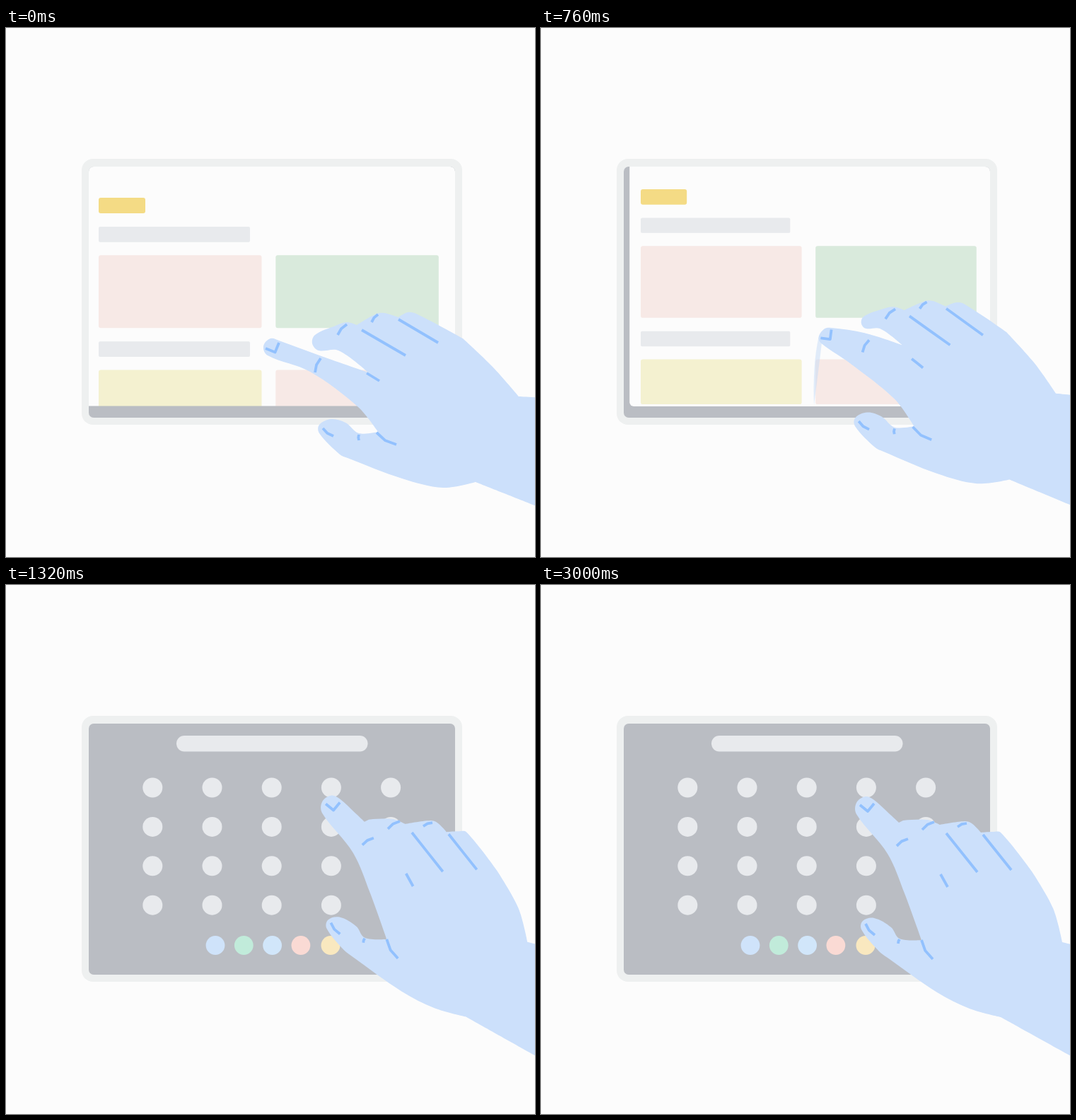
These frames come from a looping animation (748 px wide and 748 px high, 3.02 s). An HTML page with a canvas:

```html
<!DOCTYPE html>
<html lang="en">
<head>
<meta charset="utf-8">
<title>Swipe up to the launcher</title>
<style>
  html, body { margin: 0; width: 100%; height: 100%; overflow: hidden; background: #fcfcfc; }
  canvas { display: block; }
</style>
</head>
<body>
<canvas id="stage" width="748" height="748"></canvas>
<script>
const ctx = document.getElementById('stage').getContext('2d');
const LOOP = 3020;
const GREY = '#babdc3', LIGHT = '#e8eaed', HAND = '#cce0fb', CREASE = '#92c1fe';

const lerp = (a, b, k) => a + (b - a) * k;
const mix = (p, q, k) => p.map((v, i) => lerp(v, q[i], k));
const span = (t, from, to) => Math.min(1, Math.max(0, (t - from) / (to - from)));
const linear = k => k;
const easeInOut = k => (1 - Math.cos(Math.PI * k)) / 2;
const easeOut = k => 1 - (1 - k) ** 2.2;

// Keys are [time, values, easing towards that key].
function track(keys, t) {
  const next = keys.findIndex(([time]) => time > t);
  if (next < 0) return keys.at(-1)[1];
  if (next === 0) return keys[0][1];
  const [from, a] = keys[next - 1], [to, b, ease] = keys[next];
  return mix(a, b, ease(span(t, from, to)));
}

// Joints of the hand: fold (flat to raised), tilt about the wrist, curl of the index finger
const RESTING = [0, 0, 0], PRESSING = [0, 0.135, 0.3];
const JOINTS = [
  [0, RESTING],
  [560, PRESSING, easeInOut],
  [700, PRESSING, linear],
  [760, [0.25, 0, 0.17], linear],
  [1000, [1, -0.023, 0], easeOut],
  [1600, [1, 0, 0], easeOut],
];

// The app window: x, y, width, height
const FULL = [115, 196, 520, 355];
const DISC = [429.5, 420, 73, 73];
const WINDOW = [
  [700, FULL],
  [760, [125.2, 184.5, 513.5, 350.5], linear],
  [980, DISC, easeInOut],
  [1000, DISC, linear],
  [1180, [445.5, 496, 27, 27], easeInOut],
];

// Each part is drawn flat and raised; the thumb side follows the fold later.
const part = (flat, raised, options) => {
  const [a, b] = [flat, raised].map(s => s.split(' ').map(p => p.split(',').map(Number)));
  return { flat: a, raised: b, lag: 1, curls: false, bow: 0.1, ...options };
};
const INDEX = { curls: true }, THUMB = { lag: 1.6 };

const OUTLINE = [
  part('760,523 725,521 688,479 646,439 580,404 568,402 555,409 535,403 524,404 496,420 482,416 466,421 437,434 433,446 442,456 470,456 512,487',
       '760,511 737,505 724,457 694,405 650,350 638,349 622,350 609,337 599,334 564,339 546,332 524,332 512,333 510,334 508,335 506,336 506,336'),
  part('446,464 386,442 374,439 364,450 370,463',
       '492,323 471,304 459,299 446,308 446,324', INDEX),
  part('430,486 498,536 526,571 499,573 480,558 460,553 443,561 443,573 472,603 483,608 560,637 618,650 664,642 760,680',
       '490,380 514,436 538,502 507,500 495,484 471,471 455,475 453,487 478,518 490,527 560,576 606,599 650,611 760,672', THUMB),
];
const CORNERS = new Set([1, 3, 6, 9, 16, 24, 34]);
const TIP = 20;

// Creases are pairs of end points, bent sideways by the bow.
const CREASES = [
  part('367,453 386,445', '451,311 471,309', { curls: true, bow: 0.5 }),
  part('445,467 437,487', '519,359 503,369', INDEX),
  part('482,419 469,434 526,405 517,416', '556,335 539,346 602,337 589,342'),
  part('503,427 565,463 555,412 611,445 510,488 528,499',
       '573,351 617,406 625,353 665,403 565,409 575,427', { bow: 0 }),
  part('448,566 463,577 499,575 499,583 524,572 552,589',
       '459,479 472,495 507,501 505,507 538,502 554,529', THUMB),
];

function turn([x, y], [cx, cy], angle, scale = 1) {
  const dx = x - cx, dy = y - cy, cos = Math.cos(angle) * scale, sin = Math.sin(angle) * scale;
  return [cx + dx * cos + dy * sin, cy + dy * cos - dx * sin];
}

function bendPart({ flat, raised, lag, curls }, [fold, tilt, curl]) {
  const knuckle = mix([502, 508], [530, 390], fold);
  return flat.map((p, i) => {
    let q = mix(p, raised[i], fold ** lag);
    if (curls) {
      const reach = Math.hypot(q[0] - knuckle[0], q[1] - knuckle[1]) / 150;
      const bend = curl * reach ** 2;
      q = turn(q, knuckle, bend, 1 - 0.8 * bend);
    }
    return turn(q, [805, 566], tilt);
  });
}

// Smooth curve through the points, with sharp turns at CORNERS.
function traceOutline(points) {
  const heading = i => {
    const [ax, ay] = points[Math.max(i - 1, 0)];
    const [bx, by] = points[Math.min(i + 1, points.length - 1)];
    const length = Math.hypot(bx - ax, by - ay) || 1;
    return CORNERS.has(i) ? [0, 0] : [(bx - ax) / length, (by - ay) / length];
  };
  ctx.beginPath();
  ctx.moveTo(...points[0]);
  for (let i = 1; i < points.length; i++) {
    const [ax, ay] = points[i - 1], [bx, by] = points[i];
    const [ux, uy] = heading(i - 1), [vx, vy] = heading(i);
    const d = Math.hypot(bx - ax, by - ay) / 3;
    ctx.bezierCurveTo(ax + ux * d, ay + uy * d, bx - vx * d, by - vy * d, bx, by);
  }
}

function drawHand(outline, joints) {
  traceOutline(outline);
  ctx.fillStyle = HAND;
  ctx.fill();
  ctx.beginPath();
  for (const crease of CREASES) {
    const ends = bendPart(crease, joints);
    for (let i = 0; i < ends.length; i += 2) {
      const [[ax, ay], [bx, by]] = ends.slice(i, i + 2);
      ctx.moveTo(ax, ay);
      ctx.lineTo((ax + bx) / 2 - (by - ay) * crease.bow, (ay + by) / 2 + (bx - ax) * crease.bow);
      ctx.lineTo(bx, by);
    }
  }
  ctx.strokeStyle = CREASE;
  ctx.lineWidth = 3.8;
  ctx.lineJoin = 'round';
  ctx.stroke();
}

function box(x, y, w, h, r, color) {
  ctx.beginPath();
  ctx.roundRect(x, y, w, h, r);
  ctx.fillStyle = color;
  ctx.fill();
}
const dot = (x, y, r, color) => box(x - r, y - r, 2 * r, 2 * r, r, color);

function drawLauncher(alpha) {
  ctx.globalAlpha = alpha;
  box(241, 213, 270.5, 22.5, 11.2, LIGHT);
  for (let col = 0; col < 5; col++)
    for (let row = 0; row < 4; row++)
      dot(207.3 + 84.2 * col, 286.5 + 55.4 * row, 14, LIGHT);
  ['#cfe3fa', '#c1ebda', '#d1e6fa', '#fadad4'].forEach((color, i) =>
    dot(296 + 40.3 * i, 509.5, 13.4, color));
  ctx.globalAlpha = 1;
}

function drawWindow(t) {
  const [x, y, w, h] = track(WINDOW, t);
  const collapse = span(t, 800, 940);
  const [r, g, b] = mix([252, 252, 252], [249, 232, 191], collapse);
  ctx.save();
  box(x, y, w, h, lerp(6, Math.min(w, h) / 2, collapse), `rgb(${r},${g},${b})`);
  ctx.clip();
  ctx.globalAlpha = 1 - collapse;
  ctx.translate(x, y);
  ctx.scale(w / FULL[2], w / FULL[2]);
  box(16, 44, 66, 22, 3, '#f4db85');
  [['#f7e9e6', '#d9eadc', 103], ['#f4f1d0', '#f7e9e6', 64.5]].forEach(([left, right, height], row) => {
    const top = 85 + 162.3 * row;
    box(16, top, 214, 21.7, 2, LIGHT);
    box(16, top + 40.2, 230.5, height, 3, left);
    box(266.3, top + 40.2, 230.5, height, 3, right);
  });
  ctx.restore();
}

function drawTablet(t) {
  box(107, 185, 538, 376, 16, '#eef0f0');
  ctx.save();
  box(117, 196, 518, 355, 7, GREY);
  ctx.clip();
  drawLauncher(span(t, 780, 920));
  drawWindow(t);
  if (t < 760) box(117, 534.5, 518, 17, 0, GREY);
  ctx.restore();
}

function drawTrail(t, outline) {
  if (t < 710 || t > 1160) return;
  const [above, below, base] = outline.slice(TIP);
  const k = span(t, 760, 1000);
  const [lx, ly] = mix(above, below, k);
  const [rx, ry] = mix(below, base, 0.65 * k);
  const x = 386, y = 533;
  ctx.beginPath();
  ctx.moveTo(x, y);
  ctx.quadraticCurveTo(x - 2, lerp(y, ly, 0.6), lx, ly);
  ctx.lineTo(rx, ry);
  ctx.quadraticCurveTo(x + 6, lerp(y, ry, 0.53), x, y);
  ctx.globalAlpha = 0.5 * (1 - span(t, 1010, 1160));
  ctx.fillStyle = '#c5dcf7';
  ctx.fill();
  ctx.globalAlpha = 1;
}

function frame() {
  const t = performance.now() % LOOP;
  const joints = track(JOINTS, t);
  const outline = OUTLINE.flatMap(p => bendPart(p, joints));
  ctx.fillStyle = '#fcfcfc';
  ctx.fillRect(0, 0, 748, 748);
  drawTablet(t);
  drawTrail(t, outline);
  drawHand(outline, joints);
  requestAnimationFrame(frame);
}
frame();
</script>
</body>
</html>
```
